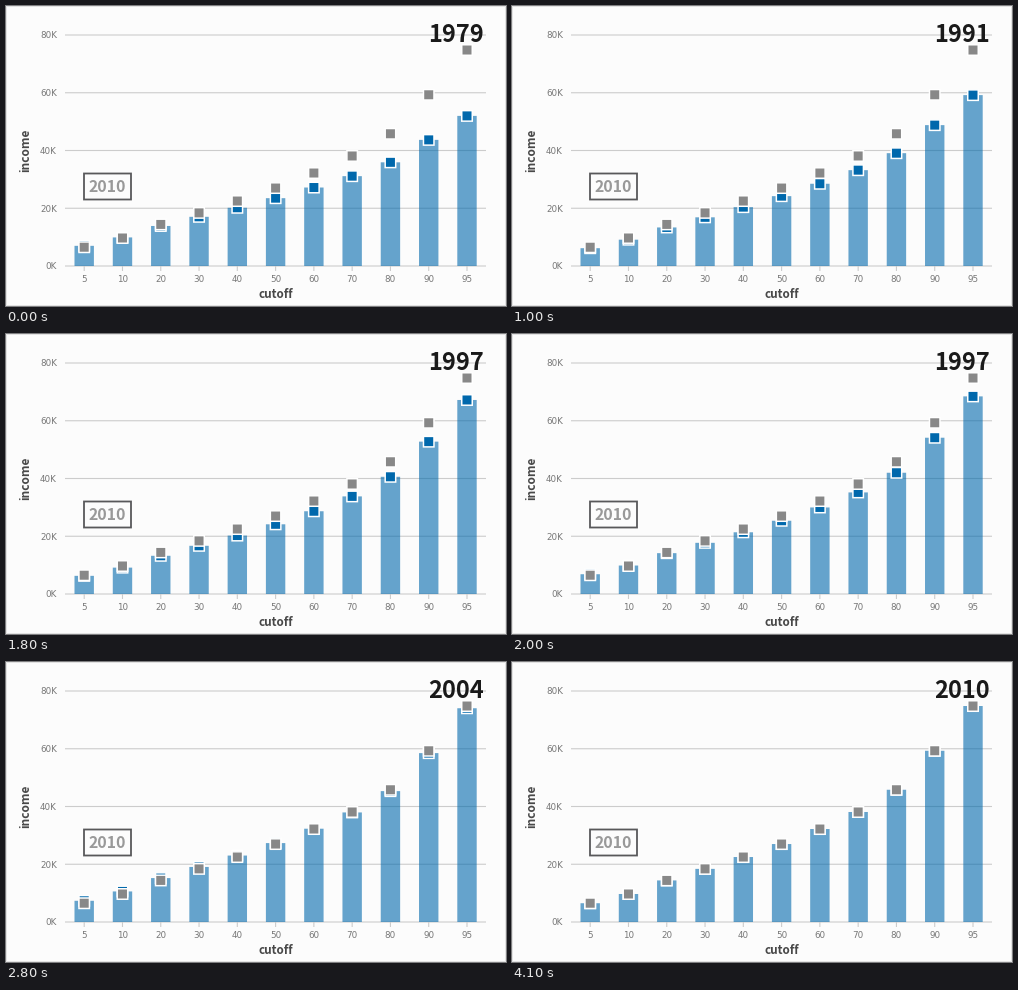
A matplotlib script for the animation above (5.5 s loop, 500x300 px).

```python
import numpy as np
import matplotlib.pyplot as plt
from matplotlib.animation import FuncAnimation
from matplotlib.patches import Rectangle

W, H, DPI = 500, 300, 100
STEP, LOOP = 100, 5500
FIRST, GAP, MOVE = 490, 415, 400    # first change, spacing, tween length (ms)
BASE, TOP = 260, 29                 # y of 0K and 80K
BAR_W, MARK_W = 19.4, 10.5
BLUE, GRAY, INK = "#0068ac", "#888888", "#484848"
BOLD_FONT = ["Noto Sans CJK JP", "Liberation Sans"]
TICK_FONT = ["DejaVu Sans"]

CUTOFFS = np.array([5, *range(10, 91, 10), 95])
CENTERS = 78.2 + 38.28 * np.arange(len(CUTOFFS))
FINAL = np.array([6.5, 9.7, 14.4, 18.4, 22.5, 27, 32.2, 38.1, 45.8, 59.3, 74.8])

# Income relative to the final year at the 10th, 50th and 95th percentile
GROWTH = {
    1979: (1.02, 0.870, 0.695),
    1986: (0.94, 0.896, 0.791),
    1991: (0.94, 0.893, 0.794),
    1994: (0.94, 0.893, 0.898),
    1997: (1.03, 0.948, 0.918),
    2000: (1.12, 1.015, 0.976),
    2004: (1.08, 1.011, 0.995),
    2007: (1.08, 1.026, 1.029),
    2010: (1, 1, 1),
}
YEARS = list(GROWTH)


def logit(percent):
    return np.log(percent / (100 - percent))


def incomes(year):
    """Bend the final distribution by a parabola through the growth points."""
    bend = np.polyfit(logit(np.array([10, 50, 95])), GROWTH[year], 2)
    return FINAL * np.polyval(bend, logit(CUTOFFS))


def ease(t):
    """Cubic in-out."""
    return 4 * t ** 3 if t < 0.5 else 1 - 4 * (1 - t) ** 3


def pt(px):
    return px * 72 / DPI


def y_of(income):
    return BASE - (BASE - TOP) * income / 80


fig = plt.figure(figsize=(W / DPI, H / DPI), dpi=DPI, facecolor="#fcfcfc")
ax = fig.add_axes([0, 0, 1, 1])
ax.set_xlim(0, W)
ax.set_ylim(H, 0)
ax.axis("off")


def label(x, y, s, size, color, **kw):
    style = dict(ha="center", va="baseline", weight="bold", family=BOLD_FONT)
    return ax.text(x, y, s, fontsize=pt(size), color=color, **{**style, **kw})


def tick_label(x, y, s, ha="center"):
    label(x, y, s, 8.8, "#777777", ha=ha, weight="normal", family=TICK_FONT)


def line(xs, ys):
    ax.plot(xs, ys, color="#cccccc", lw=pt(1.1), solid_capstyle="butt",
            snap=False, zorder=1)


def box(x, y, w, h, z, **kw):
    return ax.add_patch(Rectangle((x, y), w, h, zorder=z, snap=False, **kw))


def marker(x, y, color, z):
    return box(x - MARK_W / 2, y - MARK_W / 2, MARK_W, MARK_W, z, fc=color,
               ec="white", lw=pt(1.5))


box(0.5, 0.5, W - 1, H - 1, 0, fill=False, ec="#e2e2e2", lw=pt(1))

for k in range(0, 81, 20):
    line([59, 480], [y_of(k)] * 2)
    tick_label(51, y_of(k) + 3.3, f"{k}K", "right")
for x, cutoff in zip(CENTERS, CUTOFFS):
    line([x, x], [BASE, BASE + 5])
    tick_label(x, 275.6, str(cutoff))

label(270, 292.5, "cutoff", 11.7, INK)
label(19.5, 144, "income", 11.9, INK, rotation=90, va="center")

box(78, 167.5, 47, 26, 5, fill=False, ec="#58585a", lw=pt(1.8))
label(101.3, 185.6, "2010", 15.8, "#999999")
title = label(450.2, 36, "", 23.6, "#1a1a1a", zorder=6)

bars = [box(x - BAR_W / 2, BASE, BAR_W, 0, 2, fc=BLUE, alpha=0.6, lw=0)
        for x in CENTERS]
marks = [marker(x, BASE, BLUE, 3) for x in CENTERS]
for x, income in zip(CENTERS, FINAL):
    marker(x, y_of(income), GRAY, 4)


def update(frame):
    t = frame * STEP - FIRST
    i = int(np.clip(t // GAP + 1, 0, len(YEARS) - 1))
    title.set_text(str(YEARS[i]))
    values = incomes(YEARS[i])
    if i:
        p = ease(min((t - (i - 1) * GAP) / MOVE, 1))
        values = (1 - p) * incomes(YEARS[i - 1]) + p * values
    for bar, mark, y in zip(bars, marks, y_of(values)):
        bar.set_y(y)
        bar.set_height(BASE - y)
        mark.set_y(y - MARK_W / 2)
    return [title, *bars, *marks]


anim = FuncAnimation(fig, update, frames=LOOP // STEP, interval=STEP,
                     repeat=True, repeat_delay=0)
plt.show()
```
